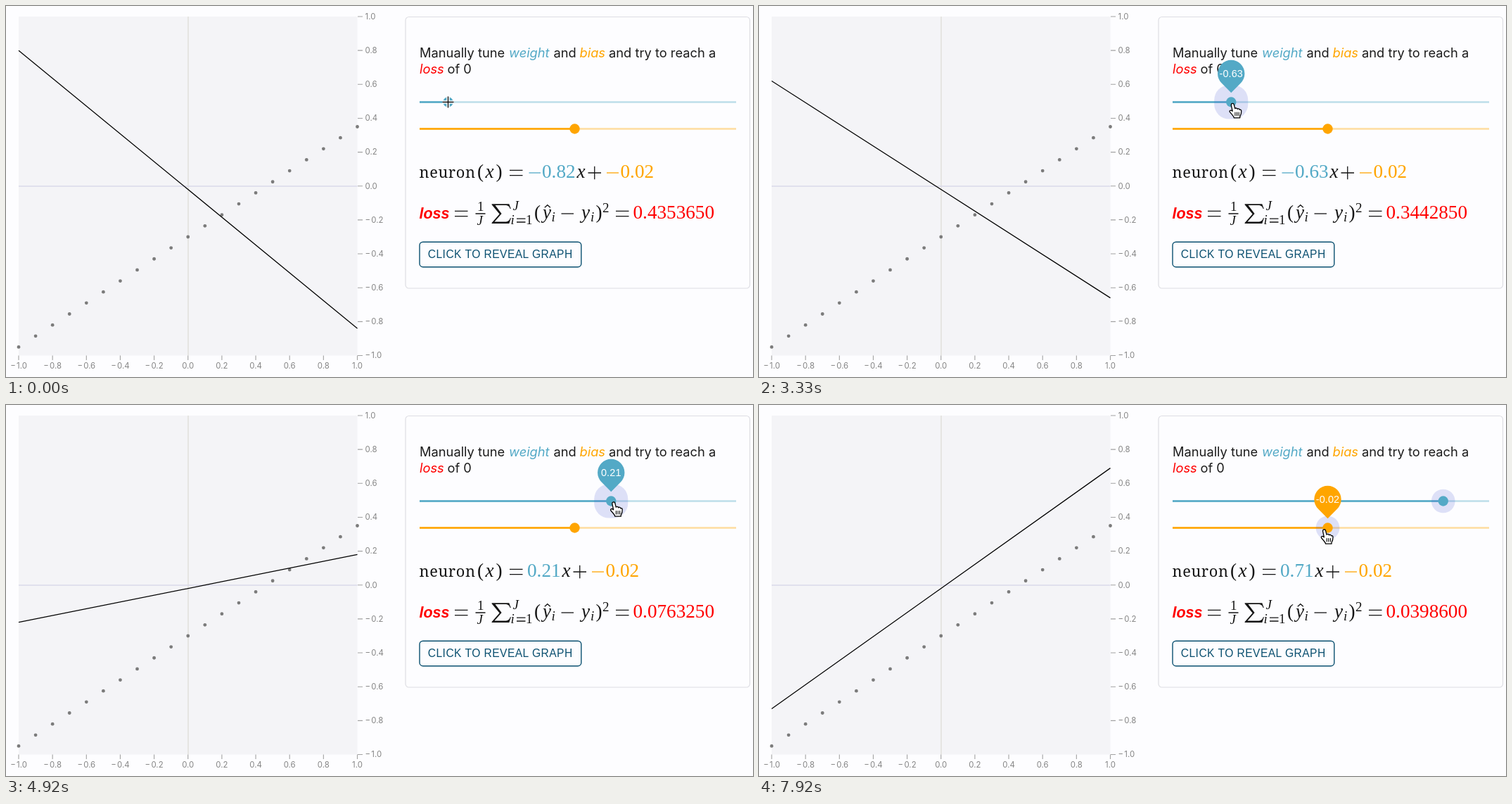
These frames come from a looping animation (1062x527 px, 8 s). An HTML page:

```html
<!DOCTYPE html>
<html lang="en">
<head>
<meta charset="utf-8">
<title>Tune a neuron</title>
<style>
  html, body { margin: 0; width: 100%; height: 100%; overflow: hidden; background: #fdfdff; }
  svg { display: block; width: 1062px; height: 527px; }
  text { white-space: pre; }
  .tick { font: 11.4px Inter, sans-serif; fill: #858585; }
  .prompt { font: 18.3px Inter, sans-serif; fill: #1c1c1c; }
  .math { font: 27.2px "Liberation Serif", serif; fill: #151515; }
  .roman { font: 21.8px "Noto Serif", serif; letter-spacing: .6px; }
  .small { font-size: 19px; }
  .it { font-style: italic; }
  .sign { fill: none; stroke: #151515; stroke-width: 1.3; }
  .blue { fill: #53a9c6; }
  .orange { fill: #ffa500; }
  .red { fill: #f00; }
  .loss { font: italic bold 21.5px "Liberation Sans", sans-serif; }
  .button { font: 15.6px "Liberation Sans", sans-serif; letter-spacing: .446px; fill: #0b5070; }
  .value { font: 14.4px "Liberation Sans", sans-serif; letter-spacing: .15px; fill: #fff; text-anchor: middle; }
  .halo { fill: rgba(63, 81, 205, .165); }
</style>
</head>
<body>
<svg viewBox="0 0 1062 527">
  <rect width="1062" height="527" fill="#fdfdff"/>
  <g id="plot"></g>
  <path id="fit" stroke="#000" stroke-width="1.25" fill="none"/>

  <rect x="568" y="15.5" width="489.5" height="385.5" rx="4.8" fill="none" stroke="#dedee3" stroke-width="1.2"/>
  <text class="prompt" y="73"><tspan x="588">Manually tune</tspan><tspan class="it blue" x="715">weight</tspan><tspan x="778.5">and</tspan><tspan class="it orange" x="815.5">bias</tspan><tspan x="857">and try to reach a</tspan></text>
  <text class="prompt" y="96"><tspan class="it red" x="588">loss</tspan><tspan x="627.5">of 0</tspan></text>

  <g class="math">
    <text class="roman" x="587.5" y="244">neuron</text>
    <text x="670" y="244">(</text>
    <text class="it" x="681.5" y="244">x</text>
    <text x="696.5" y="244">)</text>
    <path class="sign" d="M716 233.4h18.5m0 7.2h-18.5"/>
    <path id="minus" class="sign" style="stroke:#53a9c6" d="M743.5 237h16.5"/>
    <text id="weight" class="blue" y="244"></text>
    <g id="tail">
      <text class="it" x="811.5" y="244">x</text>
      <path class="sign" d="M827.5 237h18.5m-9.25-9.2v18.4"/>
      <path class="sign" style="stroke:#ffa500" d="M854 237h17"/>
      <text class="orange" x="873.5" y="244">0.02</text>
    </g>

    <text class="loss red" x="587.5" y="301.5">loss</text>
    <path class="sign" d="M638 291.4h18.5m0 7.2h-18.5M667.5 295h14"/>
    <text class="small" x="670" y="291.3">1</text>
    <text class="small it" x="669.5" y="311">J</text>
    <path d="M715.3 281.2H690.6V282.2L701.6 295.6L690.6 308V309H715.3L718 301.3H716.8C715.8 305 713.5 306.6 709.5 306.6H694.5L704.6 295L695.5 283H709.5C713.5 283 715.6 284.4 716.6 288H717.8Z"/>
    <text class="small it" x="720.5" y="289.5">J</text>
    <text class="small it" x="717.5" y="309.5">i</text>
    <path class="sign" d="M726 302.2h12.5m0 4.8h-12.5"/>
    <text class="small" x="739" y="309.5">1</text>
    <text x="751" y="302">(</text>
    <text class="it" x="763" y="302">y</text>
    <path class="sign" d="M765.8 286.3l4-3.6 4 3.6"/>
    <text class="small it" x="775.5" y="306">i</text>
    <path class="sign" d="M789.5 295h17.5"/>
    <text class="it" x="818" y="302">y</text>
    <text class="small it" x="831" y="306">i</text>
    <text x="838.5" y="302">)</text>
    <text class="small" x="848" y="292.5">2</text>
    <path class="sign" d="M867 291.4h18.5m0 7.2h-18.5"/>
    <text id="loss" class="red" x="891.5" y="302"></text>
  </g>

  <rect x="588" y="335.2" width="229.8" height="35.5" rx="4.8" fill="none" stroke="#0b5070" stroke-width="1.4"/>
  <text class="button" x="599.8" y="358.3">CLICK TO REVEAL GRAPH</text>

  <g id="sliders"></g>
  <g id="cursor">
    <g id="cross" fill="none">
      <path stroke="#fff" stroke-width="4.4" d="M-8 0H8M0-8V8"/>
      <path stroke="#111" stroke-width="1.4" d="M-8 0H8M0-8V8"/>
    </g>
    <path id="arrow" fill="#000" stroke="#fff" stroke-width="1.2" d="M0 0V16.5L3.8 13L6.4 19L9.2 17.8L6.6 12H11.6Z"/>
    <g id="hand" stroke="#000" stroke-width="1.3" stroke-linejoin="round" stroke-linecap="round">
      <path fill="#fff" d="M-2.5 1C-2.5-1.8 1-2 1.6 .6L3 6C4 5 6 5.2 6.4 6.8C7.6 5.8 9.2 6.2 9.6 7.8C11 7.2 12 8 12 9.6C12.2 13 11.4 15 10 17.5V19.2H1.5L1 17.5C-.5 15.5-2.5 13-4.3 11C-5.6 9.2-3.2 7.6-1.4 9.2L-.6 9.8Z"/>
      <path fill="none" stroke-width="1.1" d="M3.2 11.5V16M5.8 11.5V16M8.4 11.5V16"/>
    </g>
  </g>
</svg>
<script>
const $ = id => document.getElementById(id);
const LOOP = 8000, FPS = 12, BIAS = -0.02;
const px = x => 258.75 + x * 240.75;
const py = y => 255.75 - y * 240.75;
const slide = v => 588 + (v + 1) * 225;
const target = x => 0.65 * x - 0.3;
const xs = Array.from({ length: 21 }, (_, i) => (i - 10) / 10);

// Each row is a step number followed by its values.
const WEIGHT = [[0, -.82], [28, -.82], [33, -.78], [37, -.74], [43, -.53], [44, -.51],
  [47, -.51], [48, -.41], [50, -.24], [51, -.19], [52, -.17], [55, -.17], [56, -.12],
  [59, .21], [62, .40], [65, .48], [66, .51], [71, .55], [72, .55], [73, .61], [74, .64],
  [75, .66], [79, .66], [80, .68], [83, .71]];
const POINTER = [[0, 628.5, 136.5], [10, 628.5, 136.5], [13, 614, 150], [20, 773, 350],
  [21, 773, 350], [26, 631, 139], [28, 631, 139]];
const DRAG_OFFSET = [[28, 2.5, 139], [47, 2.5, 140], [48, 11, 140], [59, 4, 139], [66, 1.5, 141], [80, 1, 143]];
const LEAVE = [[87, 975, 143], [93, 800, 178], [94, 800, 178], [95, 804, 178]];
const WEIGHT_HALO = [[24, 0], [26, 9.6], [27, 9.6], [29, 16.8], [87, 16.8], [89, 9.6]];
const WEIGHT_LABEL = [[24, 0], [26, 1], [88, 1], [90, 0]];
const BIAS_HALO = [[91, 0], [93, 9.6]];
const BIAS_LABEL = [[91, 0], [93, 1]];

function at(rows, n, col = 1) {
  const i = rows.findIndex(r => r[0] > n);
  if (i === 0) return rows[0][col];
  if (i < 0) return rows[rows.length - 1][col];
  const a = rows[i - 1], b = rows[i];
  return a[col] + (b[col] - a[col]) * (n - a[0]) / (b[0] - a[0]);
}
const weightAt = n => Math.round(at(WEIGHT, n) * 100) / 100;

function drawPlot() {
  let s = `<rect x="18" y="15" width="481.5" height="481.5" fill="#f4f4f7"/>
    <path d="M259 15V496.5" stroke="#dfded7" stroke-width="1.3"/>
    <path d="M18 256H499.5" stroke="#dadaea" stroke-width="1.3"/>`;
  for (let i = -5; i <= 5; i++) {
    const v = i / 5, x = px(v), y = py(v);
    const digits = Math.abs(v).toFixed(1);
    const label = v < 0 ? `−<tspan dx="1.3">${digits}</tspan>` : digits;
    s += `<path d="M${x} 496.5v6.5M500 ${y}h7" stroke="#a2a2a2" stroke-width="1.1"/>
      <text class="tick" x="${x}" y="515.3" text-anchor="middle">${label}</text>
      <text class="tick" x="510.5" y="${y + 3.8}">${label}</text>`;
  }
  for (const x of xs) s += `<circle cx="${px(x)}" cy="${py(target(x))}" r="2.4" fill="#7b7b7b"/>`;
  $('plot').innerHTML = s;
}

function makeSlider(y, color) {
  const g = document.createElementNS('http://www.w3.org/2000/svg', 'g');
  g.setAttribute('transform', `translate(0 ${y})`);
  g.innerHTML = `<path d="M588 0H1038" stroke="${color}" stroke-opacity=".38" stroke-width="2.4"/>
    <path class="track" stroke="${color}" stroke-width="2.4"/>
    <g class="knob"><rect class="halo"/><circle r="7.2" fill="${color}"/>
      <g class="label"><path fill="${color}" d="M0-13.3L-13.6-26.9A19.2 19.2 0 1 1 13.6-26.9Z"/>
        <text class="value" y="-35.6"></text></g></g>`;
  $('sliders').append(g);
  const set = (sel, attrs) => {
    for (const k in attrs) g.querySelector(sel).setAttribute(k, attrs[k]);
  };
  return (value, spread, scale) => {
    const x = slide(value), r = 7.2 + spread;
    // Wide spreads square the halo off a little, as box shadows do.
    const rx = spread > 7.2 ? 7.2 + spread * (1 + (7.2 / spread - 1) ** 3) : r;
    set('.track', { d: `M588 0H${x}` });
    set('.knob', { transform: `translate(${x} 0)` });
    set('.halo', { x: -r, y: -r, width: 2 * r, height: 2 * r, rx, visibility: spread ? 'visible' : 'hidden' });
    set('.label', { transform: `translate(0 -9) scale(${scale}) translate(0 9)`, visibility: scale ? 'visible' : 'hidden' });
    g.querySelector('.value').textContent = value.toFixed(2);
  };
}

function drawCursor(n, w) {
  const dragging = n >= 28 && n < 88;
  const path = dragging ? DRAG_OFFSET : n < 28 ? POINTER : LEAVE;
  const x = at(path, n) + (dragging ? slide(w) : 0);
  const y = at(path, n, 2);
  const overButton = n >= 19 && n <= 21;
  const kind = n < 11 ? 'cross' : overButton || (n >= 25 && n < 89) || n >= 92 ? 'hand' : 'arrow';
  for (const id of ['cross', 'arrow', 'hand']) $(id).style.display = id === kind ? '' : 'none';
  $('cursor').setAttribute('transform', `translate(${x} ${y})`);
}

drawPlot();
const weightSlider = makeSlider(136.5, '#53a9c6');
const biasSlider = makeSlider(174.5, '#ffa500');

function draw(n) {
  const w = weightAt(n);
  // The fitted line trails the handle during quick drags.
  const fitted = n && w - weightAt(n - 1) > 0.025 ? w - 0.01 : w;
  const error = xs.reduce((sum, x) => sum + (fitted * x + BIAS - target(x)) ** 2, 0) / xs.length / 2;

  $('fit').setAttribute('d', `M${px(-1)} ${py(BIAS - fitted)}L${px(1)} ${py(BIAS + fitted)}`);
  $('loss').textContent = error.toFixed(7);
  $('weight').textContent = Math.abs(w).toFixed(2);
  $('weight').setAttribute('x', w < 0 ? 762 : 741);
  $('minus').style.display = w < 0 ? '' : 'none';
  $('tail').setAttribute('transform', `translate(${w < 0 ? 0 : -21} 0)`);

  weightSlider(w, at(WEIGHT_HALO, n), at(WEIGHT_LABEL, n));
  biasSlider(BIAS, at(BIAS_HALO, n), at(BIAS_LABEL, n));
  drawCursor(n, w);
}

const start = performance.now();
let shown = -1;
function tick() {
  const t = (performance.now() - start) % LOOP;
  const n = Math.min(95, Math.floor((t + 4) * FPS / 1000));
  if (n !== shown) draw(shown = n);
  requestAnimationFrame(tick);
}
tick();
</script>
</body>
</html>
```
